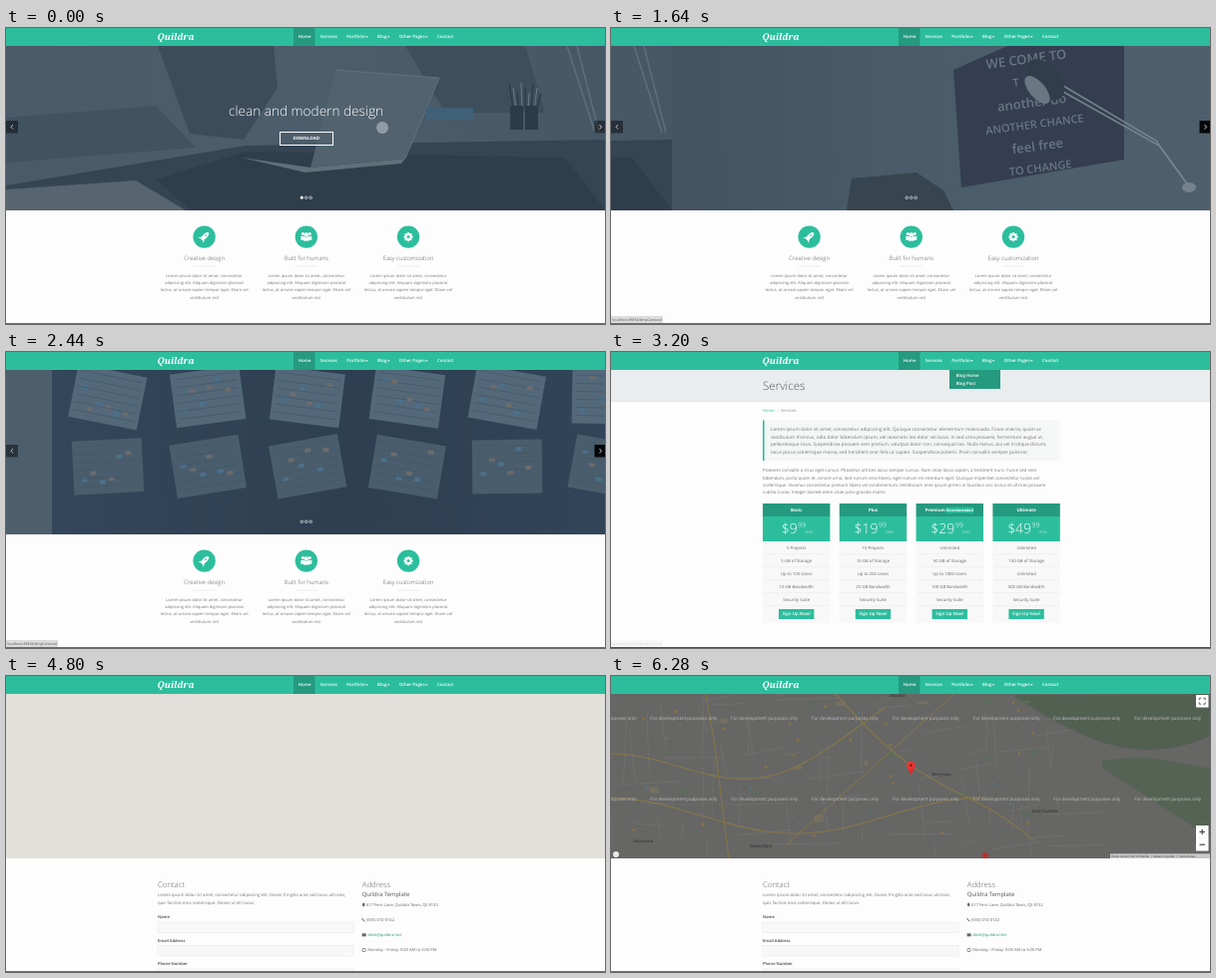
Animation, 600 px wide and 297 px high, one loop 6.32 s. Source, as an HTML page with a canvas:

```html
<!DOCTYPE html>
<html lang="en">
<head>
<meta charset="utf-8">
<style>
html, body { margin: 0; width: 100%; height: 100%; overflow: hidden; background: #fff; }
canvas { display: block; width: 600px; height: 297px; }
</style>
</head>
<body>
<canvas id="stage" width="600" height="297"></canvas>
<script>
const ctx = document.getElementById('stage').getContext('2d');
const LOOP = 6320, GREEN = '#2cbe9c', DARK_GREEN = '#259a7f';
const SANS = '"Open Sans", sans-serif', ROBOTO = 'Roboto, sans-serif';
const BRAND = 'Quildra', MAPS = 'Wendle';
const HERO = { y: 18, h: 165 };

function rect(color, x, y, w, h) {
  ctx.fillStyle = color;
  ctx.fillRect(x, y, w, h);
}
function frame(color, x, y, w, h, width = .6) {
  ctx.strokeStyle = color;
  ctx.lineWidth = width;
  ctx.strokeRect(x, y, w, h);
}
function oval(color, x, y, rx, ry = rx, angle = 0) {
  ctx.fillStyle = color;
  ctx.beginPath();
  ctx.ellipse(x, y, rx, ry, angle, 0, 7);
  ctx.fill();
}
function trace(points) {
  ctx.beginPath();
  for (let i = 0; i < points.length; i += 2) ctx.lineTo(points[i], points[i + 1]);
}
function poly(color, ...points) {
  trace(points);
  ctx.fillStyle = color;
  ctx.fill();
}
function line(color, width, ...points) {
  trace(points);
  ctx.strokeStyle = color;
  ctx.lineWidth = width;
  ctx.stroke();
}
// points of y = f(x), sampled every 6 px
function sample(from, to, f) {
  const points = [], step = Math.sign(to - from) * 6;
  for (let x = from; (to - x) * step >= 0; x += step) points.push(x, f(x));
  return points;
}
// y is the optical middle of the line
function text(str, x, y, size, color, { weight = 400, align = 'left', font = SANS } = {}) {
  ctx.font = `${weight} ${size}px ${font}`;
  ctx.textAlign = align;
  ctx.fillStyle = color;
  ctx.fillText(str, x, y + size * .33);
}
function lines(rows, x, y, step, size, color, options) {
  rows.forEach((row, i) => text(row, x, y + i * step, size, color, options));
}
function at(x, y, angle, draw) {
  ctx.save();
  ctx.translate(x, y);
  ctx.rotate(angle);
  draw();
  ctx.restore();
}
function clipHero(draw) {
  ctx.save();
  ctx.beginPath();
  ctx.rect(0, HERO.y, 600, HERO.h);
  ctx.clip();
  draw();
  ctx.restore();
}
function backdrop(...colors) {
  const g = ctx.createLinearGradient(0, 0, 600, 0);
  colors.forEach((c, i) => g.addColorStop(i / (colors.length - 1), c));
  rect(g, 0, HERO.y, 600, HERO.h);
}
function random(seed) {
  return () => (seed = seed * 16807 % 2147483647) / 2147483647;
}
// cubic-bezier(.42, 0, .58, 1)
function easeInOut(p) {
  if (p <= 0 || p >= 1) return p <= 0 ? 0 : 1;
  let lo = 0, hi = 1, u;
  for (let i = 0; i < 20; i++) {
    u = (lo + hi) / 2;
    const x = 3 * (1 - u) * u * (.42 * (1 - u) + .58 * u) + u ** 3;
    x < p ? lo = u : hi = u;
  }
  return u * u * (3 - 2 * u);
}

function navBar() {
  rect(GREEN, 0, 0, 600, 18);
  rect(DARK_GREEN, 288, 0, 21.5, 18);
  text(BRAND, 151.5, 8.5, 9.2, '#fff', { weight: 'italic 700', font: '"Noto Serif", serif' });
  let x = 292.8;
  for (const label of ['Home', 'Services', 'Portfolio ▾', 'Blog ▾', 'Other Pages ▾', 'Contact']) {
    const [name, hasMenu] = label.split(' ▾');
    text(name, x, 8.8, 4.375, '#fff', { weight: 600 });
    x += ctx.measureText(name).width;
    if (hasMenu !== undefined) {
      poly('#fff', x + .5, 8.2, x + 3.1, 8.2, x + 1.8, 9.7);
      x += 3.1;
    }
    x += 9.4;
  }
}
function statusBar(alpha) {
  ctx.globalAlpha = alpha;
  rect('#dcdcdc', 0, 289, 52, 7);
  text('localhost:49864/#myCarousel', 1.2, 292.8, 3.6, '#555');
  ctx.globalAlpha = 1;
}

function deskSlide() {
  backdrop('#4a5a69', '#4c5d6b', '#465766');
  // chair
  poly('#3c4c5a', 152, 18, 268, 18, 272, 60, 238, 112, 184, 106);
  poly('#415260', 0, 90, 150, 78, 190, 120, 0, 135);
  // shelf and desk
  poly('#3d4e5c', 400, 18, 520, 18, 540, 85, 440, 85);
  poly('#354553', 0, 158, 240, 118, 600, 112, 600, 183, 0, 183);
  poly('#56656f', 0, 162, 130, 153, 180, 183, 0, 183);
  poly('#2f3e4b', 150, 152, 240, 124, 560, 130, 600, 183, 185, 183);
  // laptop
  poly('#60707a', 236, 130, 305, 140, 400, 131, 396, 136, 300, 145);
  poly('#52636f', 330, 42, 434, 50, 400, 131, 305, 140);
  line('#66757f', .8, 330, 42, 434, 50, 400, 131);
  oval('#909ca5', 377, 100, 6);
  rect('#3f6077', 420, 80, 48, 12);
  // pens in cups
  for (let i = 0; i < 9; i++) line(i % 2 ? '#667581' : '#2b3a47', 1.2, 508 + i * 3, 82, 504 + i * 4, 55 + i % 3 * 5);
  for (let i = 0; i < 2; i++) rect('#2c3b48', 505 + i * 15, 78, 13, 24);
  for (let i = 0; i < 2; i++) line('#60707c', 1.4, 562 + i * 10, 18, 590 + i * 4, 105);
}
function posterSlide() {
  backdrop('#43535f', '#495a68', '#4d5e6c', '#4d5e6c');
  poly('#343e50', 282, 42, 336, 18, 453, 18, 453, 132, 290, 160);
  const rows = ['WE COME TO', 'T       T', 'another do', 'ANOTHER CHANCE', 'feel free', 'TO CHANGE'];
  at(362, 86, -.13, () => rows.forEach((row, i) =>
    text(row, 0, (i - 2.5) * 22, i % 2 ? 11 : 13, '#687685', { weight: 600, align: 'center' })));
  // lamp
  for (let i = 0; i < 2; i++) line('#74838e', 1.6, 392, 58 + i * 6, 485 + i * 3, 113 + i * 5, 518, 159);
  oval('#303d4a', 374, 52, 15, 24, -.7);
  oval('#697783', 366, 62, 8, 17, -.7);
  oval('#74838e', 518, 160, 7, 5);
  // chair
  poly('#36454f', 175, 183, 180, 151, 245, 145, 272, 163, 282, 183);
}
function paperSlide() {
  backdrop('#34465a', '#2d3f50', '#33455a');
  const rnd = random(41);
  for (let i = 0; i < 12; i++) {
    const x = 55 + i % 6 * 100, y = i < 6 ? 44 : 114;
    at(x, y, .2 - rnd() * .4, () => {
      rect(i < 6 ? '#536879' : '#4a5d6c', -34, -26, 70, 54);
      for (let k = 0; k < 6; k++) {
        line('#43586a', .7, -30, -20 + k * 8, 32, -20 + k * 8);
        rect(k % 2 ? '#6b6c6e' : '#4b7089', -26 + k * 9, -20 + rnd() * 35, 6, 4);
      }
    });
  }
}

function rocket() {
  oval('#fff', 0, -1, 2.2, 5);
  poly('#fff', 0, -1, 4, 5, 0, 3, -4, 5);
  oval(GREEN, 0, -2, .8);
}
function people() {
  for (const side of [-1, 1, 0]) {
    const scale = side ? .75 : 1, x = side * 3.4, y = side ? -.8 : 0;
    oval('#fff', x, y - 2.2, 2.1 * scale);
    rect('#fff', x - 2.8 * scale, y + .2, 5.6 * scale, 3.8);
  }
}
function gear() {
  for (let i = 0; i < 4; i++) at(0, 0, i * Math.PI / 4, () => rect('#fff', -1, -4.6, 2, 9.2));
  oval('#fff', 0, 0, 3.6);
  oval(GREEN, 0, 0, 1.5);
}

function carousel(shift, hover) {
  clipHero(() => [deskSlide, posterSlide, paperSlide].forEach((slide, i) => {
    const x = Math.round((i - shift) * 600);
    if (Math.abs(x) < 600) at(x, 0, 0, () => clipHero(slide));
  }));
  if (shift === 0) {
    text('clean and modern design', 300.5, 84, 13.6, '#fff', { weight: 300, align: 'center' });
    frame('#fff', 274.5, 104.5, 53, 13, 1);
    text('DOWNLOAD', 300.7, 111, 4.4, '#fff', { weight: 700, align: 'center' });
  }
  rect('rgba(0,0,0,.45)', 0, 93, 12, 12.5);
  rect(hover ? '#05080b' : 'rgba(0,0,0,.45)', 589.5, 93, 10.5, 12.5);
  line('#d5dadd', .8, 7, 97, 5, 99.2, 7, 101.4);
  line('#fff', .8, 594.5, 97, 596.5, 99.2, 594.5, 101.4);
  for (let i = 0; i < 3; i++) {
    const x = 296.3 + i * 4.4;
    oval('#d5dadd', x, 170.2, 1.6);
    oval(shift === i ? '#fff' : '#435565', x, 170.2, 1);
  }
}
function homePage(t) {
  const hover = t >= 800;
  carousel(easeInOut((t - 1174) / 600) + easeInOut((t - 1957) / 600), hover);
  const blurb = ['Lorem ipsum dolor sit amet, consectetur', 'adipiscing elit. Aliquam dignissim placerat',
    'lectus, at ornare sapien tempor eget. Etiam vel', 'vestibulum nisl'];
  const features = [['Creative design', rocket], ['Built for humans', people], ['Easy customization', gear]];
  features.forEach(([title, icon], i) => {
    const x = 198.6 + i * 102.2;
    oval(GREEN, x, 209.6, 11.2);
    at(x, 209.6, icon === rocket ? Math.PI / 4 : 0, icon);
    text(title, x, 230.6, 5.95, '#555', { weight: 300, align: 'center' });
    rect('#ddd', x - 11, 238.7, 22, .6);
    lines(blurb, x, 248.2, 7.4, 4.07, '#777', { align: 'center' });
  });
  if (hover) statusBar(1);
}

function pricePlan(plan, i) {
  const [name, price, projects, storage, users, bandwidth] = plan.split('|');
  const x = 152 + i * 76.8, c = x + 33.7, mid = { align: 'center' };
  const bold = { weight: 700, align: 'center' }, thin = { weight: 300 };
  const tagged = name === 'Premium';
  rect('#f8f8f8', x, 152, 67.4, 120);
  rect(DARK_GREEN, x, 152, 67.4, 13);
  rect(GREEN, x, 165, 67.4, 25);
  text(name, tagged ? c - 14.5 : c, 158.6, 4.4, '#fff', bold);
  if (tagged) {
    rect(GREEN, c - 4, 155.8, 28, 5.8);
    text('Recommended', c + 10, 158.7, 3.6, '#fff', bold);
  }
  const end = c + price.length * 4 - 3;
  text('$' + price, end, 177, 14, '#fff', { weight: 300, align: 'right' });
  text('99', end + .5, 174, 7, '#fff', thin);
  text('/mo', end + 7.5, 180.8, 4.4, '#fff', thin);
  const rows = [projects, storage + ' GB of Storage', users, bandwidth + ' GB Bandwidth', 'Security Suite'];
  lines(rows, c, 196.6, 12.9, 4.25, '#666', mid);
  rows.forEach((_, k) => rect('#e8e8e8', x, 202.7 + k * 12.9, 67.4, .5));
  rect(GREEN, c - 17.7, 258, 35.4, 10);
  text('Sign Up Now!', c, 263, 4.4, '#fff', { weight: 600, align: 'center' });
}
function servicesPage(t) {
  rect('#e9edee', 0, 18, 600, 32);
  rect('#dde2e3', 0, 49.5, 600, .6);
  text('Services', 152, 34.3, 11.6, '#555', { weight: 300 });
  text('Home', 152, 59, 4.07, GREEN);
  text('/', 167, 59, 4.07, '#bbb');
  text('Services', 170, 59, 4.07, '#888');
  rect('#f5f6f6', 152, 68.5, 297.5, 40.5);
  rect(GREEN, 152, 68.5, 1.6, 40.5);
  lines(['Lorem ipsum dolor sit amet, consectetur adipiscing elit. Quisque consectetur elementum malesuada. Fusce viverra, quam ac',
    'vestibulum rhoncus, odio dolor bibendum ipsum, vel venenatis leo dolor vel lacus. In sed urna posuere, fermentum augue ut,',
    'pellentesque risus. Suspendisse posuere sem pretium, volutpat dolor non, consequat leo. Nulla metus, dui vel tristique dictum,',
    'lacus purus scelerisque massa, sed hendrerit erat felis ut sapien. Suspendisse potenti. Proin convallis semper pulvinar.'],
    160, 77.7, 7.6, 4.7, '#777');
  lines(['Praesent convallis a risus eget cursus. Phasellus ultrices lacus semper cursus. Nam vitae lacus sapien, a hendrerit nunc. Fusce sed sem',
    'bibendum, porta quam et, ornare urna. Sed rutrum eros libero, eget rutrum mi interdum eget. Quisque imperdiet consectetur turpis vel',
    'scelerisque. Vivamus consectetur pretium libero vel condimentum. Vestibulum ante ipsum primis in faucibus orci luctus et ultrices posuere',
    'cubilia Curae; Integer laoreet enim vitae justo gravida mattis.'], 152, 118.8, 7.3, 4.4, '#777');
  ['Basic|9|5 Projects|5|Up to 100 Users|10', 'Plus|19|10 Projects|10|Up to 250 Users|25',
    'Premium|29|Unlimited|50|Up to 1000 Users|100', 'Ultimate|49|Unlimited|150|Unlimited|500'].forEach(pricePlan);
  if (t >= 3080 && t < 3740) {
    rect(DARK_GREEN, 339, 18, 51, 19);
    lines(['Blog Home', 'Blog Post'], 345.7, 23.2, 7.9, 4.375, '#fff', { weight: 600 });
  }
  if (t < 3340) statusBar(.2);
}

function mapTiles() {
  rect('#666665', 0, HERO.y, 600, HERO.h);
  // wooded hills
  poly('#526052', 600, 18, ...sample(402, 600, x => 18 + 56 * Math.sin((x - 400) / 88)));
  poly('#556354', ...sample(492, 600, x => 88 - 6 * Math.sin((x - 480) / 30)),
    ...sample(600, 492, x => 92 + (x - 492) * .65));
  const rnd = random(97);
  for (let i = 0; i < 75; i++) {
    const x = rnd() * 460, y = 18 + rnd() * 165, reach = 15 + rnd() * 50, tilt = rnd() * 12 - 3;
    line('#747474', .6, x, y, ...(i % 2 ? [x + reach, y - tilt] : [x + tilt, y + reach]));
  }
  for (let i = 0; i < 25; i++) rect(i % 3 ? '#5e6a5d' : '#747062', rnd() * 420, 20 + rnd() * 155, 3 + rnd() * 8, 2 + rnd() * 6);
  // highways
  const road = '#877747';
  line(road, 1.1, ...sample(0, 280, x => 94 - 16 * Math.cos(x / 48) - (x / 75) ** 3));
  line(road, 1.1, ...sample(0, 380, x => 140 + 18 * Math.sin(x / 60 - 1.5)));
  line(road, 1.1, ...sample(225, 425, x => 18 + (x - 225) * .8 + 12 * Math.sin((x - 225) / 40)));
  line(road, 1, ...sample(175, 345, x => 170 - (x - 175) * .9));
  line(road, 1, 95, 18, 104, 70, 118, 183);
  for (let i = 0; i < 30; i++) oval(i % 4 ? '#8f743f' : '#56788a', rnd() * 450, 24 + rnd() * 154, 1.3);
  const labels = [['Milpitas', 287, 20], ['Berryessa', 331, 99], ['Sunnyvale', 32, 166], ['East Foothills', 435, 136], ['Santa Clara', 150, 171]];
  for (const [label, x, y] of labels) text(label, x, y, 4.3, '#303030', { font: ROBOTO, align: 'center' });
  for (let i = 0; i < 16; i++) {
    text('For development purposes only', -8 + i % 8 * 80.8, i < 8 ? 42.2 : 123, 4.8, '#b4b4b4', { font: ROBOTO, align: 'center' });
  }
}
function marker() {
  poly('#d92d2c', 296.3, 91, 304.7, 91, 300.5, 99.5);
  oval('#e93530', 300.5, 89.7, 4.3);
  oval('#861e1c', 300.5, 89.7, 1.4);
}
function mapControls() {
  rect('#fff', 586, 19, 12.5, 12.5);
  for (let i = 0; i < 4; i++) at(592.2, 25.2, i * Math.PI / 2, () => line('#666', 1, 3, 1, 3, 3, 1, 3));
  rect('#fff', 586, 150, 12.5, 25.5);
  rect('#ddd', 588, 162.7, 8.5, .5);
  for (const y of [156.4, 169.2]) line('#444', 1.2, 589.5, y, 595, y);
  line('#444', 1.2, 592.2, 153.7, 592.2, 159.1);
  rect('#c9c9c9', 500, 178.3, 100, 4.7);
  text(`Harita verileri ©2019 ${MAPS}  |  Kullanım Şartları  |  Harita hatası`, 501, 180.7, 3, '#444', { font: ROBOTO });
  oval('#e8e8e8', 5, 179, 3);
  oval('#b53230', 375, 180, 3);
}
function mapAlert() {
  const font = ROBOTO;
  ctx.save();
  ctx.shadowColor = 'rgba(0,0,0,.4)';
  ctx.shadowBlur = 4;
  rect('#fff', 241.5, 18, 118.5, 49.7);
  ctx.restore();
  text(MAPS, 249.7, 26, 5.4, '#222', { font });
  lines([`Bu sayfa ${MAPS} Haritalar'ı doğru şekilde`, 'yükleyemedi.'], 249.7, 37, 6, 4.7, '#333', { font });
  text('Bu web sitesi sizin mi?', 249.7, 56.5, 3.8, '#777', { font });
  frame('#d8dcde', 322, 51, 29, 11);
  text('Tamam', 336.5, 56.7, 4.3, '#28707f', { font, align: 'center' });
}
function mapView(t) {
  rect('#e2e0db', 0, HERO.y, 600, HERO.h);
  if (t < 5040) return;
  clipHero(() => {
    ctx.globalAlpha = Math.min(1, (t - 5000) / 200);
    mapTiles();
    if (t < 5320) {
      rect('rgba(0,0,0,.09)', 0, HERO.y, 600, HERO.h);
      rect('rgba(255,255,255,.12)', 194, 83, 162, 80);
    }
    ctx.globalAlpha = 1;
    marker();
    if (t >= 5480) mapControls();
  });
  if (t >= 5200 && t < 5400) mapAlert();
}
function contactPage(t) {
  mapView(t);
  text('Contact', 152, 209.5, 7.8, '#666', { weight: 300 });
  lines(['Lorem ipsum dolor sit amet, consectetur adipiscing elit. Donec fringilla ante sed lacus ultricies,',
    'quis facilisis eros scelerisque. Donec ut elit lacus.'], 152, 220, 7.4, 4.3, '#777');
  ['Name', 'Email Address', 'Phone Number'].forEach((label, i) => {
    const y = 242 + i * 23.5;
    text(label, 152, y, 4.07, '#444', { weight: 600 });
    rect('#f8f8f8', 152, y + 5, 196, 10.5);
    frame('#e6e6e6', 152, y + 5, 196, 10.5, .5);
  });
  text('Address', 356.7, 209.5, 7.8, '#666', { weight: 300 });
  text(BRAND + ' Template', 356.7, 219.3, 5.95, '#555');
  oval('#666', 358.2, 229.4, 1.2, 1.9);
  line('#666', 1, 356.9, 243, 357.6, 245, 359.4, 246.2);
  rect('#666', 356.6, 258.3, 4, 3);
  oval('#666', 358.5, 275, 2);
  oval('#fff', 358.5, 275, 1.3);
  lines(['617 Fern Lane, Quildra Town, QX 8132', '(555) 010-0142'], 361, 229.7, 15, 4.07, '#666');
  text('desk@quildra.test', 362.3, 260, 4.07, DARK_GREEN);
  text('Monday - Friday: 9:00 AM to 5:00 PM', 362.3, 275, 4.07, '#666');
}

function render() {
  const t = performance.now() % LOOP;
  const page = t < 2900 ? homePage : t < 4720 ? servicesPage : contactPage;
  ctx.textRendering = 'geometricPrecision';
  rect('#fdfdfd', 0, 0, 600, 297);
  navBar();
  page(t);
  rect(page === servicesPage ? '#3f566b' : '#8f6450', 0, 296, 600, 1);
  requestAnimationFrame(render);
}
render();
</script>
</body>
</html>
```
